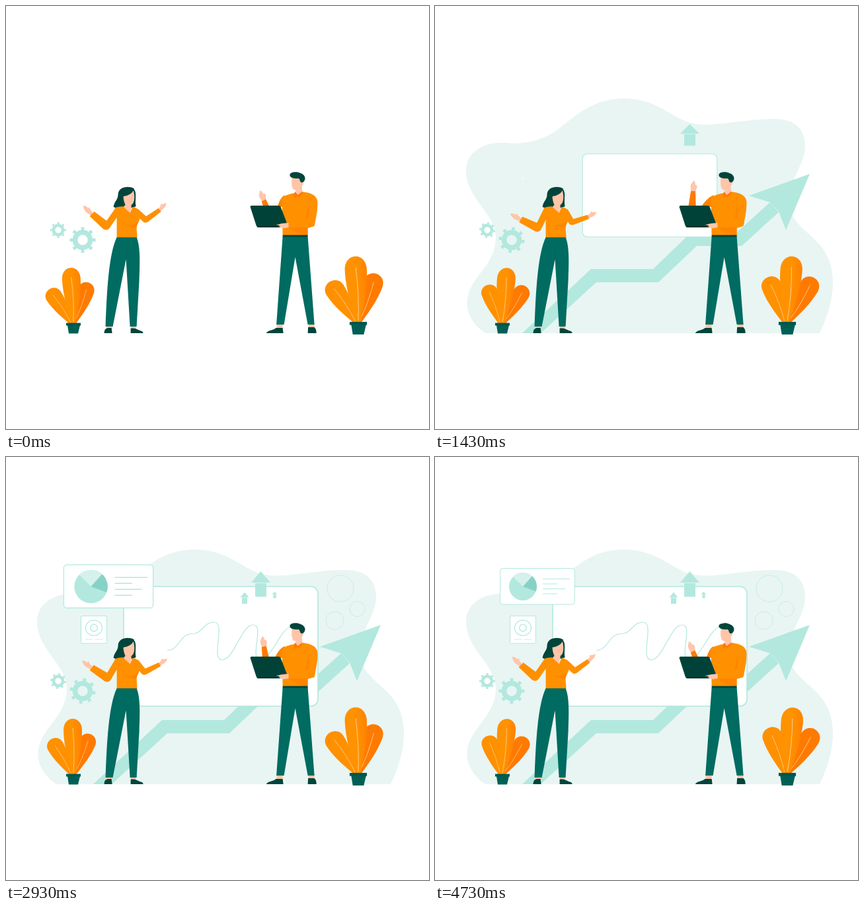
Recreate the animation shown at these times as an HTML page. Size 640 px wide and 640 px high, loop 4760 ms.

```html
<!DOCTYPE html>
<html lang="en">
<head>
<meta charset="utf-8">
<title>Growth presentation</title>
<style>
html, body { margin: 0; width: 100%; height: 100%; overflow: hidden; background: #fff; }
svg { display: block; width: 100vw; height: 100vh; }
.pop { transform-box: fill-box; transform-origin: center; }
#up1 { transform-origin: bottom; }
.mint { fill: #b3e8de; }
.line { fill: none; stroke: #b3e8de; stroke-width: 1.2; }
.thin { fill: none; stroke: #c9ece6; stroke-width: 1; }
.card { fill: #fff; stroke: #b3e8de; }
.orange { fill: #ff9000; }
.deep { fill: #ff7a00; }
.skin { fill: #ffc5a9; }
.dark { fill: #00453c; }
.pants { fill: #006b61; }
.fold { fill: #005a50; }
.sleeve { stroke: #ff9000; stroke-linecap: round; }
</style>
</head>
<body>
<svg viewBox="0 0 640 640">
  <defs>
    <clipPath id="stage"><rect y="140" width="640" height="360"/></clipPath>
    <clipPath id="wipe"><rect id="wipeBox" x="130" y="290" width="0" height="210"/></clipPath>
    <linearGradient id="leafShade"><stop offset=".5" stop-color="#ff9200"/><stop offset="1" stop-color="#ff8200"/></linearGradient>
    <g id="gear" fill="none" stroke="#b3e8de">
      <circle r="11.5" stroke-width="7.6"/>
      <circle r="17" stroke-width="5" pathLength="8" stroke-dasharray=".36 .64" stroke-dashoffset=".18"/>
    </g>
  </defs>

  <g clip-path="url(#stage)">
    <path id="blob" class="pop" fill="#e8f5f3" d="M76 495C56 481 46 463 49 442C55 408 92 392 92 350C92 315 47 290 47 250C47 220 75 205 108 207C140 210 168 203 197 178C225 156 248 140 286 140C330 140 352 163 378 174C412 188 455 171 515 171C545 171 560 187 560 212C560 240 535 262 536 298C538 346 602 345 602 418C602 447 592 474 582 495Z"/>
  </g>
  <path class="mint" clip-path="url(#wipe)" d="M132 495L236 398H330L387 343H456L507 297L520 312L464 363H396L338 418H244L160 495Z"/>
  <path id="head" class="pop mint" d="M567 254L475 287L507 297L520 311L531 339Z"/>

  <circle id="ring1" class="pop thin" cx="506" cy="199" r="20"/>
  <circle id="ring2" class="pop thin" cx="497.5" cy="247.5" r="13.5"/>
  <circle id="ring3" class="pop thin" cx="531.5" cy="230" r="11.5"/>

  <rect id="board" class="pop card" x="178" y="196" width="294" height="181" rx="10.5" stroke-width="1.6"/>
  <path id="curve" class="line" pathLength="1" stroke-dasharray="1 2"/>

  <g id="up1" class="pop mint"><path d="M385.5 173L400 190H371Z"/><path d="M377 190.8H394V211.5H377Z"/></g>
  <g id="up2" class="pop mint"><path d="M361 204.5L367.5 212.6H354.5Z"/><path d="M357 213H365V222H357Z"/></g>
  <g id="up3" class="pop mint"><path d="M406.5 203.5L410.3 208.3H402.7Z"/><path d="M404.3 208.6H408.7V213.5H404.3Z"/></g>

  <g id="target" class="pop">
    <rect class="card" x="113.5" y="240.5" width="39" height="41.5" rx="1.5"/>
    <ellipse class="line" cx="133" cy="258.5" rx="12.5" ry="11.7"/>
    <circle class="line" cx="133" cy="258.5" r="5.3"/>
    <path class="thin" d="M120 276H131M135 276H146"/>
  </g>
  <g id="report" class="pop">
    <rect class="card" x="98.7" y="168.5" width="112.6" height="54.5" rx="4"/>
    <circle class="mint" cx="133" cy="196" r="21"/>
    <path fill="#d5f1ec" d="M133 196L118 181A21 21 0 0 1 147 180.3Z"/>
    <path fill="#87d2c6" d="M133 196L147 180.3A21 21 0 0 1 152.7 203.2Z"/>
    <path class="line" d="M163 184.5H204M163 192H185M163 199.5H197M163 207H185"/>
  </g>

  <use id="gear1" href="#gear"/>
  <use id="gear2" href="#gear"/>

  <g transform="translate(.6 0)">
    <path class="dark" d="M193 276C184 271 169 274 169 285C169 293 163 296 162 304C170 308 190 307 196 303C194 294 198 283 193 277Z"/>
    <path class="skin" d="M177 288C184 287 190 284 192 279C195 287 194 299 189 301V306L186 314L177 304L180 301C178 297 177 292 177 288Z"/>
    <path class="orange" d="M164 306C168 303 173 304 176 303L187 313L191 304C196 304 200 308 203 315C203 325 197 329 197 336L198 351H167V322Z"/>
    <path class="deep" opacity=".5" d="M177 331C187 332 195 331 201 325C198 330 197 333 197 336C190 334 182 333 177 331Z"/>
    <line id="armL" class="sleeve" x1="168" y1="310" stroke-width="10"/>
    <line id="armR" class="sleeve" x1="197" y1="311" stroke-width="9"/>
    <g id="foreL">
      <path class="skin" d="M131 313L127 308L126 304L124 306C121 303 118 301 116 303C117 307 119 311 122 313L128 317Z"/>
      <path class="orange" d="M133 311L153 326L157 334C154 340 149 340 145 336L126 318Z"/>
    </g>
    <g id="foreR">
      <path class="skin" d="M230 307L233 303L234 299L236 300L242 298C242 302 240 305 237 307L233 311Z"/>
      <path class="orange" d="M230 306L210 319L205 324C208 329 212 328 215 326L234 311Z"/>
    </g>
    <path class="skin" d="M151 484H160V488H151ZM188 484H196V489H188Z"/>
    <path class="pants" d="M167 350H197C203 364 202 390 201 415L197 485H187L181 383L161 485H150C152 430 155 375 167 350Z"/>
    <path class="fold" d="M180 362L182 392L181 383Z"/>
    <path class="dark" d="M148 495C148 489 151 487 155 487H159L160 495ZM188 495V488C195 486 200 491 205 492Q207 493 207 495Z"/>
  </g>

  <g transform="translate(.6 0)">
    <path id="upperArm" fill="#ff8400"/>
    <g id="foreM">
      <path class="skin" d="M387 281C386 276 385 271 388 268L391 264L393 267V270L396 272C396 276 394 278 393 282Z"/>
      <path class="deep" d="M386.5 280H393.5L394 304L392 314H381Z"/>
    </g>
    <path class="skin" d="M432 260C431 269 431 278 438 279L436 285L442 290L448 282L447 272C450 270 450 265 447 264L444 258Z"/>
    <path class="dark" d="M429 257C427 251 440 250 445 253C452 255 453 261 451 264C450 267 447 267 446 267C443 265 445 260 440 261C435 261 430 260 429 257Z"/>
    <path class="orange" d="M417 291C423 285 431 284 436 283L441 288L448 281C460 283 468 285 470.500 294C472 306 468 322 466 333L456 336V347H418Z"/>
    <path class="deep" d="M435 284L437 281L441 286L447 281L448 283L442 290L440 287L436 291Z"/>
    <path class="deep" opacity=".55" d="M456 292C459 305 453 313 453 323H457C457 313 459 303 456 292ZM427 335H456V347H452C440 344 432 340 427 335Z"/>
    <path class="orange" d="M456 321L467 328Q466 334 461 334L427 335.5L426 328Z"/>
    <path class="skin" d="M409 480V487H418V480ZM457 480H466V487H457Z"/>
    <path class="pants" d="M418 349H456L466 482H456L437 380L420 482H408.5Z"/>
    <path class="fold" d="M434 362L438 385L437 380Z"/>
    <path class="dark" d="M418 346.5H456V349.5H418ZM393 495C396 490 404 491 408 487H418L419 495ZM456 495L456.500 486H466C469 489 469 492 469 495Z"/>
    <path fill="#004238" d="M369 304Q369 302 371 302H412Q414 302 415 304L425 330Q426 333 423 333L418 335H381Q379 335 378 332Z"/>
    <path stroke="#002f29" stroke-width="2" d="M380 334H410"/>
    <path class="skin" d="M427 328L417 329L408 331L414 332L412 333Q416 337 421 336L427 335Z"/>
  </g>

  <g id="plants"></g>
</svg>
<script>
const LOOP = 4760;
const SWING = 2500;
const $ = id => document.getElementById(id);
const set = (id, name, value) => $(id).setAttribute(name, value);
const move = (id, value) => set(id, 'transform', value);

const clamp = (v, lo, hi) => Math.min(hi, Math.max(lo, v));
const part = (t, from, to) => clamp((t - from) / (to - from), 0, 1);
const ease = x => (1 - Math.cos(Math.PI * x)) / 2;
const mix = (a, b, x) => a + (b - a) * x;

// Eased steps through [time, value] keys.
const track = (...keys) => t => keys.reduce((value, [time, next], i) =>
  i ? mix(value, next, ease(part(t, keys[i - 1][0], time))) : next, 0);

// Even growth to a peak, then an eased return to full size.
const pop = (start, peak = 1, rise = 570) => t =>
  peak * part(t, start, start + rise) - (peak - 1) * ease(part(t, start + rise, start + rise + 390));

const pops = {
  blob: pop(540, 1.062, 470),
  head: pop(900, 1, 175),
  board: pop(1110, 1.23),
  target: pop(1395, 1.2),
  report: pop(2270, 1.23),
  ring1: pop(1570),
  ring2: pop(1720),
  ring3: pop(2250),
  up2: pop(1720),
  up3: pop(2250)
};
const lift = pop(970, 1.26, 680);
const wave = track([2180, 0], [2930, 1], [3080, 1], [3680, 0], [4420, 1]);
const sway = track([0, 0], [1300, 1], [1600, 1], [2330, .1], [3600, 1], [4740, 0]);

const low = [[217, 341], [262, 315], [297, 295], [337, 329], [378, 283], [408, 312], [460, 271]];
const high = [[244, 292.5], [281, 267.5], [315, 250], [327, 307], [374, 254], [385, 306], [433, 257]];

// Joins points with level handles of equal length.
function smooth(points, reach = 18) {
  return points.map(([x, y], i) => {
    if (!i) return `M${x} ${y}`;
    const [px, py] = points[i - 1];
    return `C${px + reach} ${py} ${x - reach} ${y} ${x} ${y}`;
  }).join('');
}

const leafPath = 'M-3 0C-7 -17 -14 -43 -14 -67C-14 -78 -7 -84 0 -84C8 -84 14 -77 14 -67C14 -43 7 -17 3 0Z';
const leafKinds = [
  { x: -3, w: .9, h: .73, fill: '#ff9000', rest: -33, turn: 14 },
  { x: 1, w: .9, h: .78, fill: '#ff7a00', rest: 20, turn: 12 },
  { x: 0, w: 1, h: 1, fill: 'url(#leafShade)', rest: -2.7, turn: 8 }
];
const leaves = [];

function plant(x, y, size, start) {
  const html = leafKinds.map((kind, i) => {
    const id = `leaf${x}-${i}`;
    leaves.push({ ...kind, id, start });
    return `<g id="${id}"><g transform="scale(${kind.w} ${kind.h})"><path fill="${kind.fill}" d="${leafPath}"/>
      <path fill="none" stroke="#ffd18a" stroke-width=".8" d="M0 -2Q3 -35 0 -70"/></g></g>`;
  }).join('');
  $('plants').insertAdjacentHTML('beforeend', `<g transform="translate(${x} ${y}) scale(${size})">${html}
    <path fill="#005f55" d="M-9 3H10L7 15.5H-7Z"/><path fill="#00574d" d="M-11 -.5H11V3.5H-11Z"/></g>`);
}
plant(102, 480, 1, 30);
plant(533, 478.5, 1.19, 450);

function render(t) {
  for (const id in pops) $(id).style.transform = `scale(${pops[id](t)})`;
  $('up1').style.transform = `scale(1, ${lift(t)})`;
  set('wipeBox', 'width', 395 * part(t, 600, 940));

  const p = wave(t);
  set('curve', 'd', smooth(low.map((a, i) => a.map((v, k) => mix(v, high[i][k], p)))));
  set('curve', 'stroke-dashoffset', 1 - ease(part(t, 1800, 2260)));
  set('curve', 'visibility', t > 1800 ? 'visible' : 'hidden');

  const turn = 10 * Math.sin(Math.PI * t / LOOP);
  move('gear1', `translate(79 339) rotate(${turn}) scale(.615)`);
  move('gear2', `translate(116 354) rotate(${turn})`);

  const q = sway(t);
  const bend = (side, x, y, dx, dy, angle) => {
    set('arm' + side, 'x2', x + dx * q);
    set('arm' + side, 'y2', y + dy * q);
    move('fore' + side, `translate(${dx * q} ${dy * q}) rotate(${angle * q} ${x} ${y})`);
  };
  bend('L', 152, 333, 3.5, 2.5, -14);
  bend('R', 210, 323, -4, 3.5, 17);
  move('foreM', `translate(${q - 1} ${14 * (1 - q)}) rotate(${-25 * (1 - q)} 390 279)`);
  set('upperArm', 'd', `M421 286Q${414 - 3 * q} 290 ${410 - 8 * q} 304H421Z`);

  // Each plant swings out, back and out again, then rests.
  for (const { id, x, rest, turn, start } of leaves) {
    const beat = clamp((t - start) / (SWING / 2), 0, 3);
    move(id, `translate(${x} 0) rotate(${rest + turn * ease(beat)})`);
  }
}

const start = performance.now();
function frame() {
  render((performance.now() - start) % LOOP);
  requestAnimationFrame(frame);
}
frame();
</script>
</body>
</html>
```
